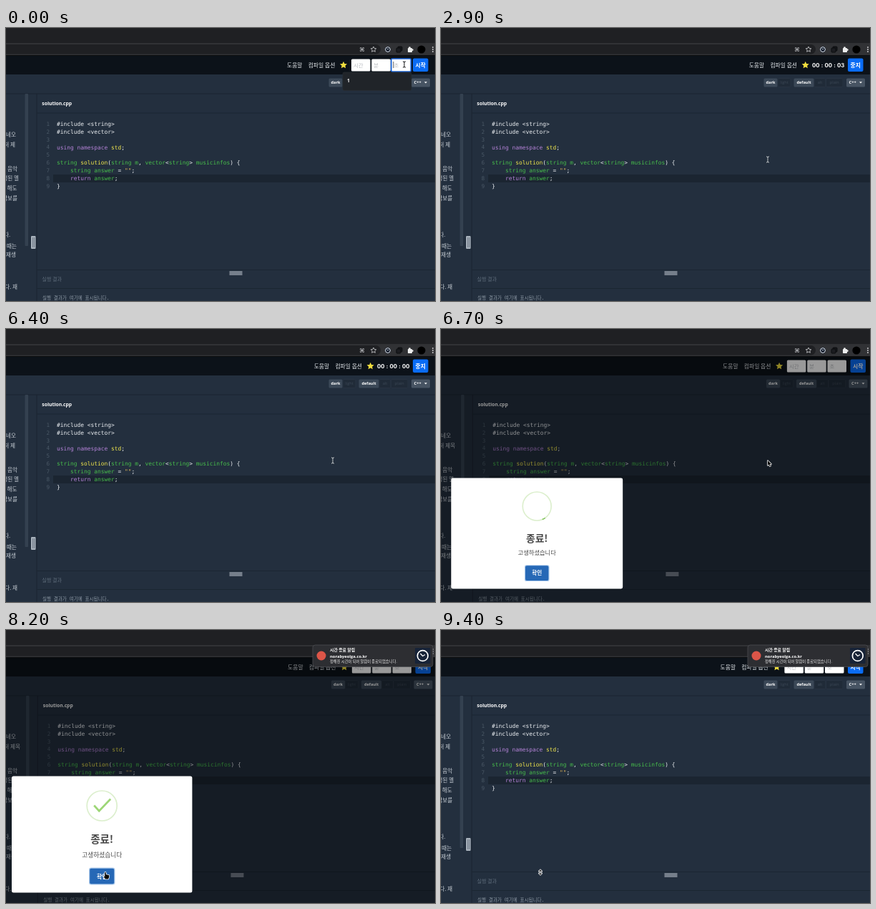
An HTML page with a canvas for the animation above (9500 ms loop, 600 px wide and 382 px high).

```html
<!DOCTYPE html>
<html lang="ko">
<head>
<meta charset="utf-8">
<title>Timer</title>
<style>
html, body { margin: 0; width: 100%; height: 100%; overflow: hidden; background: #232f3e; }
canvas { display: block; width: 600px; height: 382px; }
</style>
</head>
<body>
<canvas id="stage"></canvas>
<script>
const W = 600, H = 382, LOOP = 9500;
const KR = '"Noto Sans CJK KR", "Noto Sans CJK", sans-serif';
const SANS = '"Open Sans", "Noto Sans CJK KR", sans-serif';
const MONO = '"DejaVu Sans Mono", "Noto Sans CJK KR", monospace';
const START = 1450, DONE = 6460, CLOSE = 8984, CLOSED = 9134;

const canvas = document.getElementById('stage');
const c = canvas.getContext('2d');
const dpr = window.devicePixelRatio || 1;
canvas.width = W * dpr;
canvas.height = H * dpr;

const clamp = v => Math.max(0, Math.min(1, v));
const span = (t, a, b) => clamp((t - a) / (b - a));
const mix = (a, b, p) => a + (b - a) * p;
const smooth = p => p * p * (3 - 2 * p);

function rect(x, y, w, h, fill) {
  c.fillStyle = fill;
  c.fillRect(x, y, w, h);
}

function box(x, y, w, h, r, fill, stroke, lw = 1) {
  c.beginPath();
  c.roundRect(x, y, w, h, r);
  if (fill) { c.fillStyle = fill; c.fill(); }
  if (stroke) { c.strokeStyle = stroke; c.lineWidth = lw; c.stroke(); }
}

function disc(x, y, r, fill) {
  c.beginPath();
  c.arc(x, y, r, 0, Math.PI * 2);
  c.fillStyle = fill;
  c.fill();
}

function ring(x, y, r, color, lw, a = 0, b = Math.PI * 2) {
  c.beginPath();
  c.arc(x, y, r, a, b);
  c.strokeStyle = color;
  c.lineWidth = lw;
  c.stroke();
}

function line(points, color, lw) {
  c.beginPath();
  points.forEach(([x, y]) => c.lineTo(x, y));
  c.strokeStyle = color;
  c.lineWidth = lw;
  c.stroke();
}

// y is the visual middle of the line
function text(s, x, y, size, color, { font = KR, weight = 400, align = 'left' } = {}) {
  c.font = `${weight} ${size}px ${font}`;
  c.textAlign = align;
  c.fillStyle = color;
  c.fillText(s, x, y + size * 0.37);
}

function star(x, y, r, fill) {
  c.beginPath();
  for (let i = 0; i < 10; i++) {
    const a = -Math.PI / 2 + i * Math.PI / 5, k = i % 2 ? r * 0.48 : r;
    c.lineTo(x + k * Math.cos(a), y + k * Math.sin(a));
  }
  c.closePath();
  if (fill) { c.fillStyle = fill; c.fill(); }
  else { c.strokeStyle = '#d4d5d7'; c.lineWidth = 0.8; c.stroke(); }
}

function browserBar() {
  rect(0, 0, W, 21, '#1f2023');
  rect(0, 21, W, 17, '#313235');
  rect(0, 38, W, 1, '#0a0b0d');
  box(-10, 23, 534, 13.5, 6.5, '#1f2023');
  text('⌘', 498, 30, 8, '#c4c5c8', { font: '"DejaVu Sans", sans-serif', align: 'center' });
  star(514, 30, 4);
  disc(534, 30, 4.2, '#101a2a');
  ring(534, 30, 3.4, '#e2e6ec', 1);
  line([[532.6, 28.8], [534, 30], [535.4, 28.8]], '#e2e6ec', 0.8);
  box(548, 26, 6, 6, 1, '#15161a', '#0b0c0e');
  box(546, 28, 6, 6, 1, '#1b1c20', '#0b0c0e');
  box(562, 28, 6, 6, 0.8, '#eceded');
  disc(564.5, 27.6, 1.4, '#eceded');
  disc(568.3, 30.6, 1.4, '#eceded');
  disc(581, 30, 5.6, '#000');
  [27, 30, 33].forEach(y => disc(597, y, 0.9, '#d8d9db'));
}

function blueButton(label, x) {
  box(x, 42.5, 21.5, 18.5, 2, '#0a6cf5');
  text(label, x + 10.7, 52, 7.8, '#fff', { weight: 700, align: 'center' });
}

function headerLinks(x) {
  text('도움말', x, 52, 7.8, '#dfe3e7');
  text('컴파일 옵션', x + 29.7, 52, 7.8, '#dfe3e7');
  star(x + 79, 52, 5.3, '#efdd3e');
}

function inputs(x) {
  ['시간', '분', '초'].forEach((s, i) => {
    box(x + i * 28.3, 43.5, 26.5, 17, 1.5, '#fff');
    if (i < 2 || x !== 483) text(s, x + 3 + i * 28.3, 52, 7.4, '#b9bcc0');
  });
}

function header(t, open) {
  rect(0, 39, W, 26, '#0c1219');
  if (t < START) {
    headerLinks(393);
    inputs(483);
    box(538.8, 43, 27.5, 18, 1.5, '#fff', '#1c66d8', 1.7);
    if (t < 100) {
      text('초', 542.5, 52, 7.4, '#b9bcc0');
      rect(541.5, 47, 0.8, 9, '#333');
    } else {
      text('5', 542, 51.5, 7.8, '#333');
    }
    blueButton('시작', 569);
  } else if (t < DONE) {
    headerLinks(430.7);
    const left = t < 1900 ? 5 : t < 2700 ? 4 : t < 3600 ? 3 : t < 4500 ? 2 : t < 5500 ? 1 : 0;
    const opt = { font: 'Inter, sans-serif', weight: 700, align: 'center' };
    ['00', ':', '00', ':', '0' + left].forEach((s, i) =>
      text(s, 524.2 + i * 8.75, 51.8, 7.8, '#fff', opt));
    blueButton('중지', 569);
  } else {
    const dx = open ? 3.5 : 0;
    headerLinks(390.6 + dx);
    inputs(480.4 + dx);
    blueButton('시작', 569 + dx);
  }
}

function chip(label, x, w, on) {
  box(x, 70.5, w, 12, 1.5, on ? '#3b4857' : '#202b38', on ? null : '#2b3746', 0.7);
  text(label, x + w / 2, 76.3, 5.6, on ? '#fff' : '#3d4957',
    { font: SANS, weight: on ? 700 : 400, align: 'center' });
}

function optionBar(dx) {
  chip('dark', 451.5 + dx, 19, true);
  chip('light', 471 + dx, 18, false);
  chip('default', 493.5 + dx, 28, true);
  chip('alt', 522 + dx, 16, false);
  chip('plain', 538.5 + dx, 23.5, false);
  box(567 + dx, 70.5, 26, 12, 1.5, '#475463');
  text('C++', 570.5 + dx, 76.3, 5.8, '#fff', { font: SANS, weight: 700 });
  c.beginPath();
  c.moveTo(585 + dx, 75.3);
  c.lineTo(589 + dx, 75.3);
  c.lineTo(587 + dx, 77.6);
  c.fillStyle = '#fff';
  c.fill();
}

const TONES = { w: '#eef1f4', p: '#b583d8', g: '#47bd4b', y: '#f0e64c', o: '#e5b95c' };
// each part is a tone letter followed by its text
const CODE = [
  ['w#include <string>'],
  ['w#include <vector>'],
  [],
  ['pusing namespace ', 'ystd', 'w;'],
  [],
  ['gstring ', 'ysolution', 'w(', 'gstring m', 'w, ', 'gvector', 'w<', 'gstring', 'w> ', 'gmusicinfos', 'w) {'],
  ['g    string answer ', 'w= ', 'o""', 'w;'],
  ['p    return ', 'ganswer', 'w;'],
  ['w}']
];

function editor(dx) {
  const x0 = 71 + dx;
  rect(42.5 + dx, 92, 1, 290, '#1a2430');
  rect(43 + dx, 118.5, W, 1, '#1b2632');
  text('solution.cpp', 50.3 + dx * 1.3, 105.5, 6.8, '#fff', { font: SANS, weight: 700 });
  rect(66 + dx, 205, W, 11, '#1b2531');
  CODE.forEach((parts, i) => {
    const y = 134 + i * 10.87;
    text(String(i + 1), 61 + dx, y, 7.6, '#4a5866', { font: MONO, align: 'right' });
    let x = x0;
    parts.forEach(p => {
      text(p.slice(1), x, y, 7.9, TONES[p[0]], { font: MONO });
      x += (p.length - 1) * 4.75;
    });
  });
  rect(43 + dx, 338, W, 1, '#1b2632');
  [340.5, 342.5, 344.5].forEach(y => rect(312.5 + dx * 1.6, y, 18, 1, '#c9d0d7'));
  text('실행 결과', 50.3 + dx, 351, 7.1, '#5c6a78');
  rect(43 + dx, 364, W, 1, '#1b2632');
  text('실행 결과가 여기에 표시됩니다.', 51 + dx, 378, 6.5, '#8c98a4', { font: MONO });
}

function sidePanel(open) {
  const rows = [
    ['네오', 14, 149], [open ? '저 제목' : '저 제', open ? 20 : 13, 163],
    ['음악', 16, 197], ['성된 멜', 18, 210], ['해도', 15.5, 224], ['악보를', 16, 238],
    ['다.', 6, 289], ['때는', 15, 305], ['재생', 14, 317], ['다. 재', 16, 362]
  ];
  rows.forEach(([s, x, y]) => text(s, x, y, 7.6, '#c6cdd4', { align: 'right' }));
  const dx = open ? 1.5 : 0;
  box(26.5 + dx, 92, 4.5, 213, 1, '#344150');
  box(35 + dx, 291, 6.5, 18, 1, '#a9b3bd');
  [37, 39].forEach(x => rect(x + dx, 293, 0.8, 14, '#5a6673'));
}

function page(t, open) {
  const dx = open ? 1.2 : 0;
  rect(0, 39, W, H - 39, '#232f3e');
  header(t, open);
  rect(0, 91.5, W, 1, '#1a2430');
  optionBar(open ? 3.5 : 0);
  sidePanel(open);
  editor(dx);
  if (t < 400) {
    box(471, 62, 96, 25.5, 2, '#202429', '#2a2f35', 0.6);
    text('1', 477, 74, 6.6, '#fff', { font: SANS, weight: 700 });
  }
}

function successIcon(t) {
  ring(0, -40, 21, '#dcefcd', 1.7);
  const turn = span(t, 6600, 6900);
  if (turn > 0 && turn < 1) {
    const a = mix(0.3, 1.9, turn);
    ring(0, -40, 21, '#86c562', 1.7, a + 0.12, a + 0.35);
  }
  const p = span(t, 6800, 7150);
  if (!p) return;
  const a = [-11, -40.5], b = [-4, -32.8], e = [12, -49.5];
  const along = (u, v, k) => [mix(u[0], v[0], k), mix(u[1], v[1], k)];
  const points = [a, along(a, b, clamp(p / 0.35))];
  if (p > 0.35) points.push(along(b, e, (p - 0.35) / 0.65));
  line(points, '#9dd676', 2.7);
}

function popScale(p) {
  if (p < 0.45) return mix(0.7, 1.05, p / 0.45);
  if (p < 0.8) return mix(1.05, 0.95, (p - 0.45) / 0.35);
  return mix(0.95, 1, (p - 0.8) / 0.2);
}

function modal(t) {
  const out = span(t, CLOSE, CLOSED);
  const k = t < CLOSE ? popScale(span(t, DONE, DONE + 300)) : mix(1, 0.5, out);
  c.save();
  c.globalAlpha = 1 - out * 0.9;
  c.translate(134.2, 286);
  c.scale(k, k);
  box(-126.2, -81.5, 252.4, 163, 2.5, '#fff');
  successIcon(t);
  text('종료!', 0, 7, 14.5, '#484848', { weight: 700, align: 'center' });
  text('고생하셨습니다', 0, 28.7, 8.7, '#4c4c4c', { align: 'center' });
  if (t >= 8900) c.globalAlpha *= 0.5;
  box(-18.2, 46.5, 36.4, 24, 3, '#a9c8ea');
  box(-17, 47.7, 34, 21.6, 2, t >= 8400 && t < 8500 ? '#1f5a9f' : '#2668b6');
  text('확인', 0, 58.6, 7.9, '#fff', { weight: 700, align: 'center' });
  c.restore();
}

function notification(t) {
  const p = span(t, 6900, 7300);
  if (!p) return;
  c.save();
  c.translate(175 * Math.pow(1 - p, 3), 0);
  box(429, 21, 168, 30.5, 3.5, '#2d2e32', '#515256', 0.7);
  disc(441, 36, 6.5, '#dc5548');
  text('시간 종료 알림', 453, 28, 5.9, '#fff', { weight: 700 });
  text('norabyeolga.co.kr', 453, 36.5, 5.8, '#fff', { font: SANS, weight: 700 });
  text('정해진 시간이 되어 알람이 종료되었습니다.', 453, 44.5, 5.3, '#f0f0f0', { weight: 500 });
  box(572, 25, 21.5, 22, 1, '#172338');
  ring(582.8, 36, 7.4, '#fff', 1.7);
  line([[579.5, 33], [582.8, 36.5], [586, 34.5]], '#fff', 1.3);
  c.restore();
}

const PATH = [
  [0, 557, 51], [400, 557, 51], [1000, 579, 53], [1900, 579, 53], [2800, 457, 184],
  [7400, 457, 184], [8200, 139, 340], [8900, 139, 339], [LOOP, 139, 339]
];

function pointer(t) {
  const i = PATH.findIndex((k, n) => n && t < k[0]);
  const a = PATH[i - 1], b = PATH[i], p = smooth(span(t, a[0], b[0]));
  return [mix(a[1], b[1], p), mix(a[2], b[2], p)];
}

function pointerKind(t, x, y, open) {
  if (t >= CLOSED) return 'row';
  if (open) return t < 8900 && x > 116 && x < 152 && y > 333 ? 'hand' : 'arrow';
  if (y < 62 && x > 569) return 'hand';
  if (y > 92) return 'beam';
  return t < START && x < 569 ? 'darkBeam' : 'arrow';
}

function shape(points, fill) {
  c.beginPath();
  points.forEach(([x, y]) => c.lineTo(x, y));
  c.closePath();
  c.lineJoin = 'round';
  c.strokeStyle = '#fff';
  c.lineWidth = 1.5;
  c.stroke();
  c.fillStyle = fill;
  c.fill();
}

function cursor(t, open) {
  const [x, y] = pointer(t);
  const kind = pointerKind(t, x, y, open);
  c.save();
  c.translate(x, y);
  if (kind === 'arrow') {
    shape([[0, 0], [0, 7], [1.6, 5.6], [2.8, 8.2], [4, 7.6], [2.9, 5.1], [5, 5]], '#0a0a0a');
  } else if (kind === 'hand') {
    shape([[-0.8, -1], [0.6, -1], [0.8, 2], [5.4, 3.2], [5, 6.2], [4, 8.6], [0, 8.6], [-2.8, 4.6], [-0.8, 5]], '#0a0a0a');
  } else if (kind === 'row') {
    shape([[-2.2, -1.4], [0, -3.8], [2.2, -1.4]], '#111');
    shape([[-2.2, 1.4], [0, 3.8], [2.2, 1.4]], '#111');
    rect(-2.4, -0.5, 4.8, 1, '#fff');
  } else {
    const dark = kind === 'darkBeam';
    [[dark ? '#fff' : '#16202b', 2.2], [dark ? '#151515' : '#cdd3d9', 1]].forEach(([color, lw]) => {
      line([[0, -3.6], [0, 3.6]], color, lw);
      line([[-2, -4.2], [0, -3.5], [2, -4.2]], color, lw);
      line([[-2, 4.2], [0, 3.5], [2, 4.2]], color, lw);
    });
  }
  c.restore();
}

function draw(t) {
  const open = t >= DONE && t < CLOSED;
  c.setTransform(dpr, 0, 0, dpr, 0, 0);
  c.clearRect(0, 0, W, H);
  browserBar();
  page(t, open);
  const shade = 0.4 * span(t, DONE, DONE + 100) * (1 - span(t, 9000, 9350));
  if (shade) rect(0, 39, W, H - 39, `rgba(0,0,0,${shade})`);
  if (open) modal(t);
  notification(t);
  cursor(t, open);
}

const begin = performance.now();
function tick() {
  draw((performance.now() - begin) % LOOP);
  requestAnimationFrame(tick);
}
tick();
</script>
</body>
</html>
```
